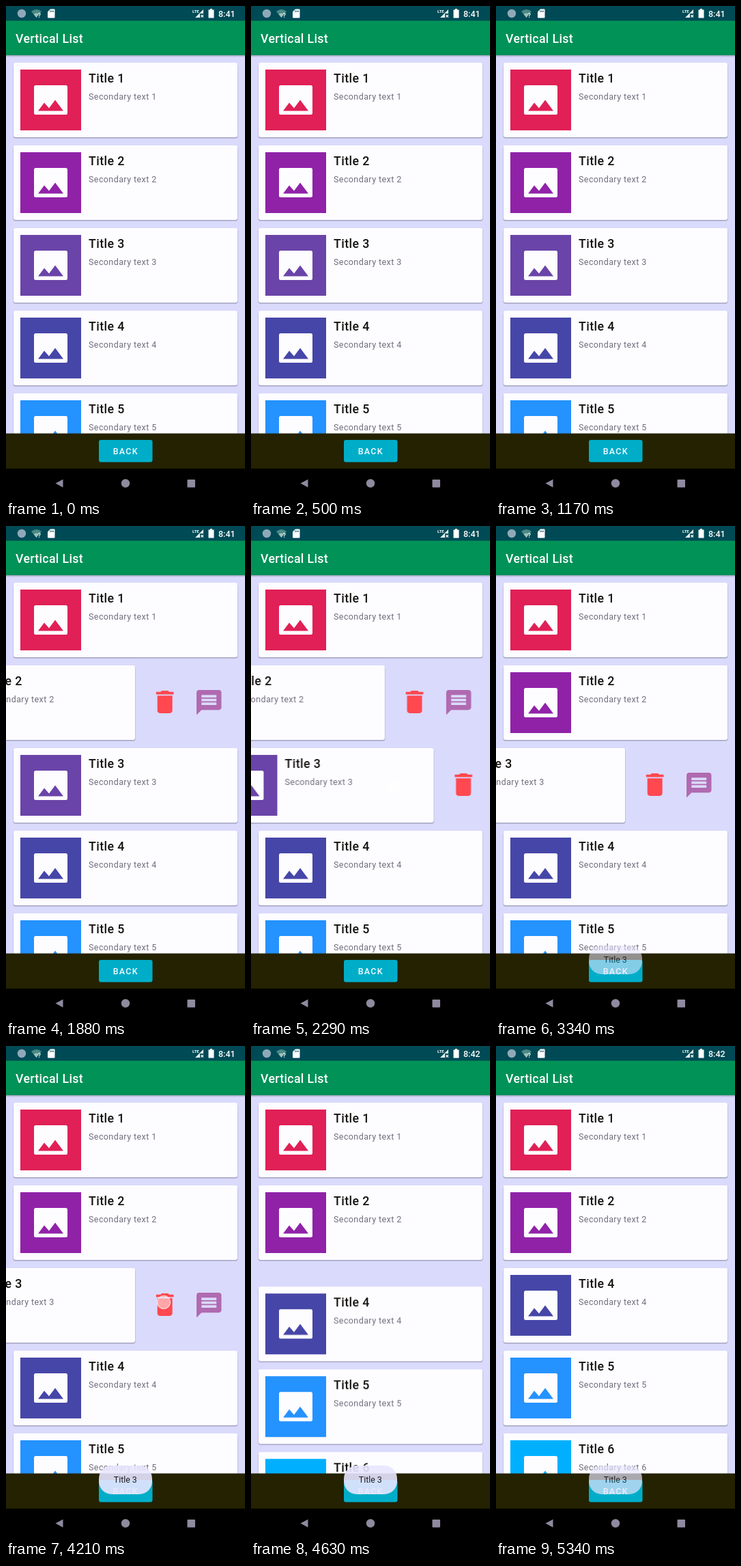
An HTML page for the animation above (5.39 s loop, 350 by 720 pixels).

```html
<!DOCTYPE html>
<html lang="en">
<head>
<meta charset="utf-8">
<title>Vertical List</title>
<style>
  html, body { margin: 0; width: 100%; height: 100%; overflow: hidden; background: #dadafc; }
  svg { display: block; width: 350px; height: 720px; }
  text { font-family: Roboto, "Noto Sans", sans-serif; white-space: pre; }
  .title { font-size: 17.8px; font-weight: 500; letter-spacing: .4px; fill: #15130f; }
  .body { font-size: 12.47px; letter-spacing: .43px; fill: #706d7c; }
  .head { font-size: 17.8px; font-weight: 500; letter-spacing: .3px; fill: #fff; }
  .button { font-size: 12.47px; font-weight: 500; letter-spacing: 1.3px; fill: #f4fbff; }
  .clock { font-size: 12.5px; font-weight: 500; fill: #fff; }
  .toast { font-size: 12.4px; fill: #1d1c22; }
</style>
</head>
<body>
<svg viewBox="0 0 350 720">
  <defs>
    <linearGradient id="shade" x2="0" y2="1">
      <stop offset="0" stop-color="#55556a" stop-opacity=".45"/>
      <stop offset="1" stop-color="#55556a" stop-opacity="0"/>
    </linearGradient>
    <g id="actions">
      <path fill="#ff4850" transform="translate(360.7 31.5) scale(1.83)"
        d="M6 19c0 1.1.9 2 2 2h8c1.1 0 2-.9 2-2V7H6v12zM19 4h-3.5l-1-1h-5l-1 1H5v2h14V4z"/>
      <path fill="#b06ab0" transform="translate(425.4 32.4) scale(1.82)"
        d="M20 2H4c-1.1 0-2 .9-2 2v18l4-4h14c1.1 0 2-.9 2-2V4c0-1.1-.9-2-2-2zm-2 12H6v-2h12v2zm0-3H6V9h12v2zm0-3H6V6h12v2z"/>
    </g>
  </defs>

  <rect width="350" height="720" fill="#dadafc"/>
  <g id="list"></g>

  <rect y="72" width="350" height="3" fill="url(#shade)"/>
  <rect y="21" width="350" height="51" fill="#009257"/>
  <rect width="350" height="21.5" fill="#004a55"/>
  <text class="head" x="14" y="54">Vertical List</text>

  <g id="status">
    <circle cx="23" cy="11" r="6.2" fill="#8fa9b8"/>
    <path d="M37 8Q44.500 2 52 8L44.500 17Z" fill="#4d8a86"/>
    <path d="M40.500 12Q44.500 9 48 12L44.500 17Z" fill="#9cc2bd"/>
    <text x="46.500" y="17" font-size="9" font-weight="700" fill="#e6f2f2">?</text>
    <path d="M65 4.500h5.500q1 0 1 1v11q0 1-1 1h-8.500q-1 0-1-1v-8z" fill="#fff"/>
    <path d="M64.800 6.500v2.500M67 6.500v2.500M69.200 6.500v2.500" stroke="#004a55"/>
    <text x="273" y="9.500" font-size="6" font-weight="700" fill="#fff">LTE</text>
    <path d="M277 17L289 5V11H284V17Z" fill="#e8f1f2"/>
    <path d="M285.500 13l3.500 3.500m0-3.500l-3.500 3.500" stroke="#fff" stroke-width="1.100"/>
    <path d="M299 4h3v1.500h2.500v12h-8v-12h2.500z" fill="#fff"/>
  </g>
  <text class="clock" id="before" x="311" y="15.700">8:41</text>
  <text class="clock" id="after" x="311" y="15.700">8:42</text>

  <rect y="625.500" width="350" height="52" fill="#242200"/>
  <rect x="136" y="635" width="78.500" height="32.500" rx="3" fill="#00adc8"/>
  <text class="button" x="156.700" y="656">BACK</text>

  <rect y="677" width="350" height="43" fill="#000"/>
  <g fill="#8f8a9f">
    <path d="M72.500 698.500L83.500 692.700V704.500Z"/>
    <circle cx="175" cy="698.500" r="6.200"/>
    <rect x="265.500" y="693" width="11.500" height="11.500" rx="1"/>
  </g>

  <g id="toast">
    <rect x="136" y="614" width="78" height="42" rx="19" fill="#e8e6ff" fill-opacity=".9"/>
    <text class="toast" x="174.800" y="639" text-anchor="middle">Title 3</text>
  </g>
  <circle id="touch" r="9.500" fill="#fff" fill-opacity=".5" stroke="#fff" stroke-opacity=".6" stroke-width="1.500"/>
</svg>
<script>
const LOOP = 5390, TOP = 83, PITCH = 121;
const COLORS = ['#e02056', '#9022a8', '#6a44a8', '#4646a8', '#2492ff', '#00b0ff'];
const SINE = 'cubic-bezier(.37,0,.63,1)', OUT = 'cubic-bezier(.2,.6,.4,1)', CUT = 'step-end';
const $ = id => document.getElementById(id);

const cardMarkup = (color, i) => `
  <g transform="translate(0 ${TOP + i * PITCH})"><g id="card${i + 1}">
    <g id="slide${i + 1}">
      <rect x="10.500" y="1" width="329" height="109.800" rx="3.500" fill="#8c8ca8" fill-opacity=".6"/>
      <rect x="11" width="328" height="109" rx="3" fill="#fdfcff"/>
      <rect x="21" y="10" width="89" height="89" fill="${color}"/>
      <rect x="41" y="33" width="49" height="43" rx="2.500" fill="#fdfcff"/>
      <path d="M47 70.500L56 58.500L63 66.500L72 54.500L84 70.500Z" fill="${color}"/>
      <text class="title" x="121" y="28.500">Title ${i + 1}</text>
      <text class="body" x="121" y="54.300">Secondary text ${i + 1}</text>
      ${i === 1 || i === 2 ? '<use href="#actions"/>' : ''}
    </g>
  </g></g>`;
$('list').innerHTML = COLORS.map(cardMarkup).join('');

// Steps are [ms, value, easing until the next step].
function play(id, prop, steps, format = v => v) {
  const all = [[0, steps[0][1]], ...steps, [LOOP, steps[steps.length - 1][1]]];
  const frames = all.map(([ms, v, easing = 'linear']) =>
    ({ offset: ms / LOOP, [prop]: format(v), easing }));
  $(id).animate(frames, { duration: LOOP, iterations: Infinity });
}
const shiftX = v => `translate(${v}px, 0px)`;
const shiftY = v => `translate(0px, ${v}px)`;
const place = ([x, y]) => `translate(${x}px, ${y}px)`;

// Swipe the second card open, then the third one, which closes the second.
play('slide2', 'transform', [
  [1240, 0, SINE], [1500, -125, OUT], [1700, -150],
  [2250, -150, SINE], [2540, -8, CUT], [2630, -3], [2660, 0]], shiftX);
play('slide3', 'transform', [
  [2160, 0, SINE], [2400, -125, OUT], [2540, -148, CUT], [2630, -149], [2660, -150]], shiftX);

// Remove the third card and close the gap.
play('card3', 'opacity', [[4340, 1], [4460, 0]]);
for (const n of [4, 5, 6])
  play('card' + n, 'transform', [[4460, 0, SINE], [4710, -PITCH]], shiftY);

play('touch', 'transform', [
  [1180, [285, 262]], [1240, [280, 262], SINE], [1500, [155, 262], CUT],
  [2100, [285, 383]], [2160, [280, 383], SINE], [2400, [155, 383], CUT],
  [3060, [297, 378], CUT], [4130, [231, 375], CUT]], place);
play('touch', 'opacity', [
  [0, 0, CUT], [1180, 1, CUT], [1520, 0, CUT], [2100, 1, CUT], [2420, 0, CUT],
  [3060, 1, CUT], [3200, 0, CUT], [4130, 1, CUT], [4290, 0]]);

play('toast', 'opacity', [[3240, 0], [3400, 1], [5250, 1], [LOOP, .65]]);
play('before', 'opacity', [[0, 1, CUT], [4460, 0]]);
play('after', 'opacity', [[0, 0, CUT], [4460, 1]]);
</script>
</body>
</html>
```
